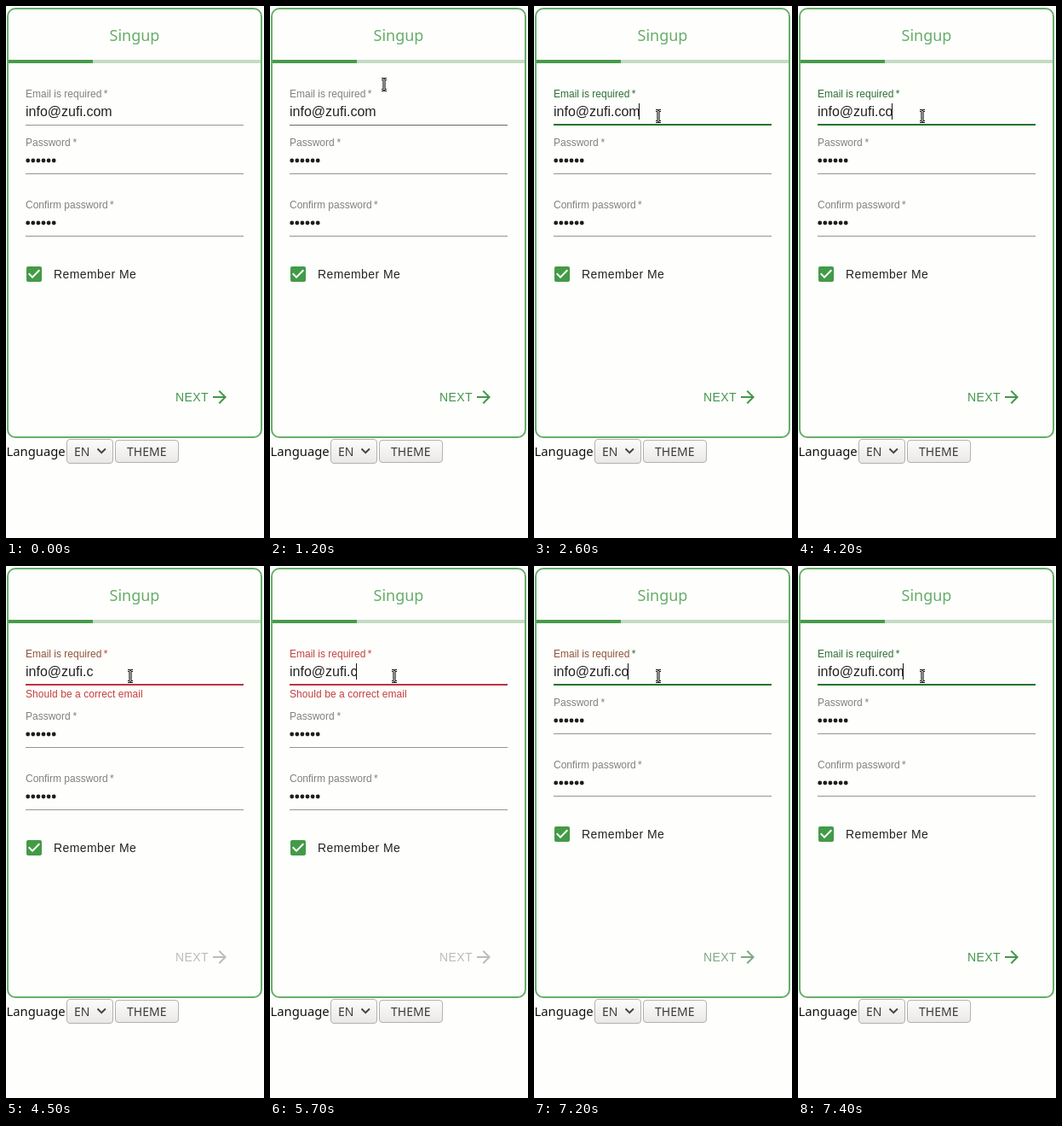
An HTML page for the animation above (8000 ms loop, 303 by 623 pixels).

```html
<!DOCTYPE html>
<html lang="en">
<head>
<meta charset="utf-8">
<title>Signup form</title>
<style>
  html, body { margin: 0; width: 100%; height: 100%; overflow: hidden; background: #fefefd; }
  svg { display: block; width: 303px; height: 623px; }
  text { font-family: "Liberation Sans", Arial, sans-serif; font-variant-ligatures: none; white-space: pre; }
  .ui { font-family: "Noto Sans", sans-serif; }
  .label { font-size: 12px; fill: #80807e; }
  .rule { fill: #949492; }
</style>
</head>
<body>
<svg viewBox="0 0 303 623">
  <defs>
    <linearGradient id="face" x2="0" y2="1">
      <stop stop-color="#fcfcfb"/>
      <stop offset="1" stop-color="#e9e8e6"/>
    </linearGradient>
    <g id="dots" fill="#1e1e1e"></g>
  </defs>

  <!-- card -->
  <rect x="2" y="3" width="298" height="502" rx="9" fill="none" stroke="#66ae69" stroke-width="2"/>
  <text class="ui" x="121.5" y="41" font-size="18" font-weight="500" fill="#66ae69">Singup</text>
  <rect x="3" y="63" width="296" height="4" fill="#c4dcc2"/>
  <rect x="3" y="63" width="99" height="4" fill="#479a4a"/>

  <!-- email -->
  <text class="label" id="label" x="23" y="107">Email is required<tspan id="star" dx="2.4">*</tspan></text>
  <text id="email" x="23" y="129" font-size="16" fill="#222"></text>
  <rect id="base" x="23" y="139" width="256" height="1"/>
  <rect id="line" y="138" height="2"/>
  <rect id="caret" y="114" width="1" height="19" fill="#111"/>
  <text id="error" x="23" y="154" font-size="12" letter-spacing=".07" fill="#c2403f">Should be a correct email</text>

  <!-- remaining fields -->
  <g id="rest">
    <text class="label" x="23" y="164">Password<tspan dx="2.8">*</tspan></text>
    <use href="#dots" y="181"/>
    <rect class="rule" x="23" y="196" width="256" height="1"/>
    <text class="label" x="23" y="237">Confirm password<tspan dx="2.4">*</tspan></text>
    <use href="#dots" y="254"/>
    <rect class="rule" x="23" y="269" width="256" height="1"/>
    <path transform="translate(21 302)" fill="#439a47" d="M19 3H5c-1.11 0-2 .9-2 2v14c0 1.1.89 2 2 2h14c1.11 0 2-.9 2-2V5c0-1.1-.89-2-2-2zm-9 14l-5-5 1.41-1.41L10 14.17l7.59-7.59L19 8l-9 9z"/>
    <text x="56" y="319" font-size="14" letter-spacing=".42" fill="#222">Remember Me</text>
  </g>

  <g id="next">
    <text x="199" y="463" font-size="14" letter-spacing=".4">NEXT</text>
    <path transform="translate(239 446)" d="M12 4l-1.41 1.41L16.17 11H4v2h12.17l-5.58 5.59L12 20l8-8z"/>
  </g>

  <!-- footer -->
  <text class="ui" x="0.5" y="527" font-size="14.8" font-weight="500" fill="#111">Language</text>
  <g fill="url(#face)" stroke="#b3b1ae">
    <rect x="71.5" y="507.5" width="54" height="28" rx="3.5"/>
    <rect x="128.5" y="508.5" width="74" height="26" rx="3.5"/>
  </g>
  <g class="ui" font-size="14" fill="#3b3b3b">
    <text class="ui" x="80" y="527">EN</text>
    <text class="ui" x="142" y="527">THEME</text>
  </g>
  <path d="M107.5 518.5l4.7 4.7 4.7-4.7" fill="none" stroke="#444" stroke-width="2"/>

  <!-- text pointer -->
  <g id="pointer" fill="none" stroke-linejoin="round">
    <path d="M-3 -6.5H-1.2L0 -5.3L1.2 -6.5H3M0 -5.3V5.3M-3 6.5H-1.2L0 5.3L1.2 6.5H3" stroke="#111" stroke-width="3.2"/>
    <path d="M-3 -6.5H-1.2L0 -5.3L1.2 -6.5H3M0 -5.3V5.3M-3 6.5H-1.2L0 5.3L1.2 6.5H3" stroke="#fefefd" stroke-width="1"/>
  </g>
</svg>
<script>
const LOOP = 8000;
const MAIL = "info@zufi.com";
const GRAY = "#80807e", GREEN = "#2d6f33", RED = "#c2403f";
const LINE_GREEN = "#23752a", LINE_RED = "#b8353f";
const ON = "#43964a", OFF = "#bcbcba";

// Each step changes only the listed properties.
const steps = [
  [0, { pointer: null, base: "#949492", grow: 0, line: LINE_GREEN, label: GRAY, star: GRAY,
        cut: 0, caret: false, error: false, next: ON }],
  [1100, { pointer: [128, 29] }],
  [1200, { pointer: [134, 92], base: "#686866" }],
  [1300, { pointer: [139, 128], base: "#222" }],
  [1500, { pointer: [145, 129] }],
  [2100, { grow: 0.28, caret: true }],
  [2200, { grow: 0.9, label: "#4d7550", star: "#4d7550" }],
  [2300, { grow: 1, label: GREEN, star: GREEN }],
  [2500, { pointer: [146, 129] }],
  [3000, { caret: false }],
  [3300, { caret: true }],
  [4200, { cut: 1 }],
  [4500, { cut: 2, caret: false, error: true, line: LINE_RED, label: "#8d5439", star: RED, next: OFF }],
  [4600, { label: "#bd433e" }],
  [5000, { label: RED }],
  [5700, { caret: true }],
  [6900, { caret: false }],
  [7200, { cut: 1, caret: true, error: false, line: LINE_GREEN, label: "#8d5439", star: GREEN, next: "#7fa982" }],
  [7300, { cut: 0, label: "#45693a", next: ON }],
  [7400, { label: GREEN }]
];

const el = id => document.getElementById(id);
const set = (id, attrs) => {
  for (const key in attrs) el(id).setAttribute(key, attrs[key]);
};
const show = (id, on) => set(id, { visibility: on ? "visible" : "hidden" });

for (let i = 0; i < 6; i++) {
  const dot = document.createElementNS("http://www.w3.org/2000/svg", "circle");
  dot.setAttribute("cx", 25.7 + 6.1 * i);
  dot.setAttribute("r", 2.4);
  el("dots").append(dot);
}

function draw(time) {
  const s = Object.assign({}, ...steps.filter(([at]) => at <= time).map(([, change]) => change));

  el("email").textContent = MAIL.slice(0, MAIL.length - s.cut);
  set("label", { style: `fill:${s.label}` });
  set("star", { fill: s.star });
  set("base", { fill: s.base });
  set("line", { x: 151 - 128 * s.grow, width: 256 * s.grow, fill: s.line });
  set("caret", { x: Math.floor(22 + el("email").getComputedTextLength()) });
  set("rest", { transform: `translate(0 ${s.error ? 16 : 0})` });
  set("next", { fill: s.next });
  show("caret", s.caret);
  show("error", s.error);
  show("pointer", s.pointer);
  if (s.pointer) set("pointer", { transform: `translate(${s.pointer})` });
}

const start = performance.now();
function tick() {
  draw((performance.now() - start) % LOOP);
  requestAnimationFrame(tick);
}
tick();
</script>
</body>
</html>
```
